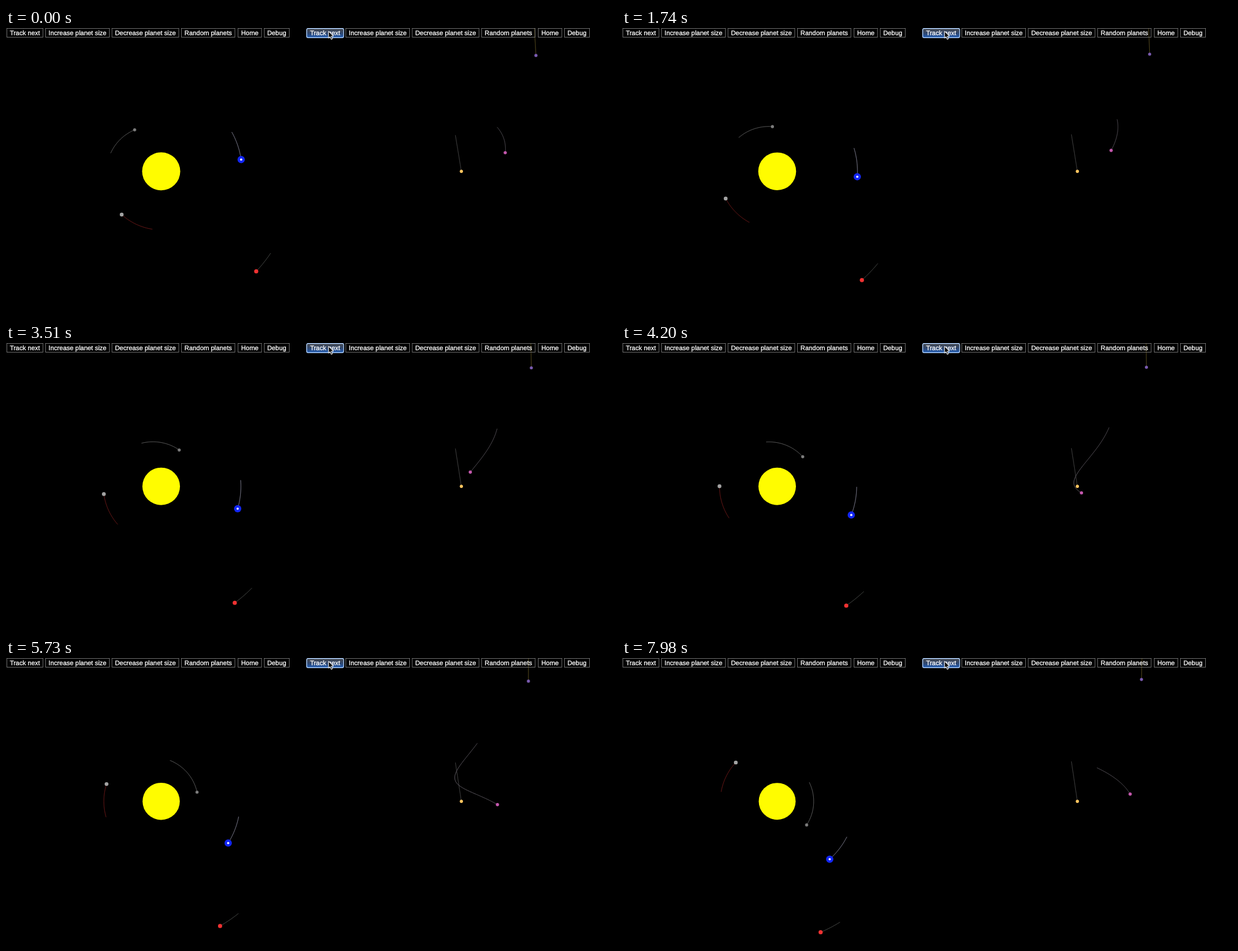
Animation, 1024 px wide and 483 px high, one loop 8000 ms. Source, as an HTML page:

```html
<!DOCTYPE html>
<html lang="en">
<head>
<meta charset="utf-8">
<title>Planet tracking</title>
<style>
  html, body { margin: 0; width: 100%; height: 100%; overflow: hidden; background: #000; }
  svg { display: block; width: 1024px; height: 483px; }
  text {
    font: 10.95px "Liberation Sans", Arial, sans-serif; text-rendering: geometricPrecision;
    fill: #fff; stroke: #fff; stroke-width: .3; text-anchor: middle;
  }
  .button { fill: none; stroke: #6c6c6c; }
  .focus { fill: url(#pressed); stroke: #a9caf5; stroke-width: 1.4; }
  .trail { fill: none; stroke-width: .9; stroke-linejoin: round; }
</style>
</head>
<body>
<svg viewBox="0 0 1024 483">
  <defs>
    <linearGradient id="pressed" x1="0" y1="0" x2="0" y2="1">
      <stop offset="0" stop-color="#484a4f"/>
      <stop offset=".5" stop-color="#31476c"/>
      <stop offset="1" stop-color="#1f5cb6"/>
    </linearGradient>
  </defs>
  <circle id="sun" cx="260.5" cy="241.2" fill="#fffc00"/>
  <g id="space"></g>
  <g id="bars"></g>
  <path d="M541.3 5.5v11.6l2.7-2.5 1.9 4.6 2.1-.9-1.9-4.4h3.7z" fill="#111" stroke="#fff"/>
</svg>
<script>
const LOOP = 8000, STEP = 30, TRAIL = 2.95, SAMPLES = 120;
const GRAVITY = 37800;
const SUN = [260.5, 241.2], TRACKED = [764.4, 241.2];
const $ = id => document.getElementById(id);
const rad = deg => deg * Math.PI / 180;

function add(parent, tag, attrs, text = '') {
  const el = document.createElementNS('http://www.w3.org/2000/svg', tag);
  for (const name in attrs) el.setAttribute(name, attrs[name]);
  el.textContent = text;
  return parent.appendChild(el);
}

// The left view slowly zooms out; the right one follows the yellow planet
const zoom = t => 1 - .004 * t;
const zoomed = ([x, y], u, t) => [SUN[0] + x * zoom(t), SUN[1] + y * zoom(t)];
const follow = (vx, ax = 0) => ([x, y], u, t) => [
  TRACKED[0] + x - (vx - ax * t) * (t - u),
  TRACKED[1] + y - (20.6 + .27 * t) * (t - u)
];

// Kepler orbit: size a, eccentricity e, nearest point at angle w and time at;
// grow and turn let size and axis drift per second
function orbit({ a, e = 0, w, at = 0, spin = 1, grow = 0, turn = 0 }) {
  const rate = Math.sqrt(GRAVITY / a ** 3);
  return t => {
    const dt = t - at;
    const mean = Math.atan2(Math.sin(rate * dt), Math.cos(rate * dt));
    let E = Math.PI * Math.sign(mean);
    for (let i = 0; i < 12; i++) E -= (E - e * Math.sin(E) - mean) / (1 - e * Math.cos(E));
    const size = a * (1 + grow * dt), axis = rad(w + turn * dt);
    const x = size * (Math.cos(E) - e);
    const y = spin * size * Math.sqrt(1 - e * e) * Math.sin(E);
    return [
      x * Math.cos(axis) - y * Math.sin(axis),
      x * Math.sin(axis) + y * Math.cos(axis)
    ];
  };
}

const bodies = [
  { r: 2.6, fill: '#7c7c7c', line: '#707070', view: zoomed, path: orbit({ a: 77.3, e: .181, w: 0, at: 6.33 }) },
  { r: 3.2, fill: '#a2a2a2', line: '#84201f', view: zoomed, path: orbit({ a: 98.5, w: 132.3 }) },
  { r: 6.1, fill: '#1226f5', line: '#9d9db4', view: zoomed, path: orbit({ a: 135.7, w: -8.4 }), moon: 1.9 },
  { r: 3.5, fill: '#f03232', line: '#5c5f5c', view: zoomed, path: orbit({ a: 248.8, e: .0925, w: 0, at: -13.81 }) },
  { r: 2.7, fill: '#fcc55f', line: '#555', view: follow(3.4), path: () => [0, 0] },
  { r: 2.7, fill: '#c558ae', line: '#625e66', view: follow(3.4),
    path: orbit({ a: 46.3, e: .89, w: 164.4, at: 4.03, spin: -1, grow: .0145, turn: .64 }) },
  { r: 2.6, fill: '#7a5bb0', line: '#71622a', view: follow(3.3, .2), path: t => [125.2 - 2.2 * t, -195 - 1.27 * t] }
];

for (const b of bodies) b.trail = add($('space'), 'polyline', { class: 'trail', stroke: b.line });
for (const b of bodies) {
  b.dots = [add($('space'), 'circle', { r: b.r, fill: b.fill })];
  if (b.moon) b.dots.push(add($('space'), 'circle', { r: b.moon, fill: '#f4f4ff' }));
}

const BUTTONS = [
  ['Track next', 1, 62.5], ['Increase planet size', 66, 174], ['Decrease planet size', 177.5, 290.5],
  ['Random planets', 294, 384.7], ['Home', 389, 429.5], ['Debug', 433, 476]
];
for (const offset of [0, 504]) {
  for (const [label, left, right] of BUTTONS) {
    const x = left + offset, focus = offset && left === 1;
    add($('bars'), 'rect', focus
      ? { class: 'focus', x: x - .3, y: .8, width: right - left + .6, height: 15.4, rx: 2.5 }
      : { class: 'button', x: x + .5, y: .5, width: right - left - 1, height: 15 });
    add($('bars'), 'text', { x: (left + right) / 2 + offset, y: 12 }, label);
  }
}

function draw(t) {
  $('sun').setAttribute('r', 32 * zoom(t));
  for (const b of bodies) {
    const [x, y] = b.view(b.path(t), t, t);
    for (const dot of b.dots) {
      dot.setAttribute('cx', x);
      dot.setAttribute('cy', y);
    }
    const line = [];
    for (let i = 0; i <= SAMPLES; i++) {
      const u = t - TRAIL * i / SAMPLES;
      line.push(b.view(b.path(u), u, t).map(v => v.toFixed(2)).join());
    }
    b.trail.setAttribute('points', line.join(' '));
  }
}

const start = performance.now();
function tick() {
  const ms = (performance.now() - start) % LOOP;
  draw(Math.floor(ms / STEP) * STEP / 1000);
  requestAnimationFrame(tick);
}
tick();
</script>
</body>
</html>
```
